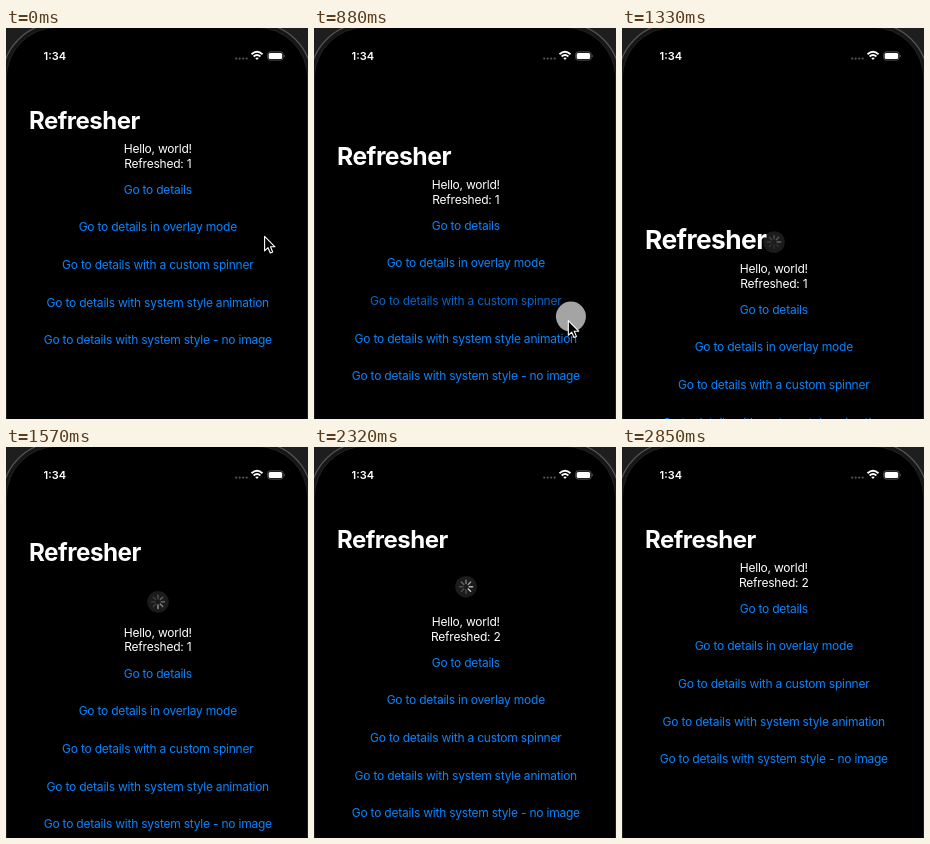
Write an HTML page that moves like this. It is 302 px wide and 391 px high and loops after 3800 ms.

```html
<!DOCTYPE html>
<html lang="en">
<head>
<meta charset="utf-8">
<title>Pull to refresh</title>
<style>
  html, body { margin: 0; width: 100%; height: 100%; overflow: hidden; background: #000; }
  svg { display: block; width: 302px; height: 391px; }
  text { font-family: Inter, "Liberation Sans", sans-serif; font-size: 12px; letter-spacing: -.22px; fill: #fff; }
  .mid { text-anchor: middle; }
  .link { fill: #0a84ff; }
  #title { font-size: 24px; font-weight: 700; letter-spacing: -.5px; }
  #clock { font-size: 11px; font-weight: 600; letter-spacing: 0; }
</style>
</head>
<body>
<svg viewBox="0 0 302 391">
  <rect width="302" height="391" fill="#1e1e1e"/>
  <rect x="-3.5" y="-4.5" width="309" height="520" rx="54.5" fill="#161616" stroke="#555" stroke-width="1.2"/>
  <rect x=".3" y="-.7" width="301.4" height="520" rx="51" fill="#000" stroke="#2a2a2a" stroke-width=".8"/>

  <g id="content">
    <text class="mid" x="151.8" y="124.7">Hello, world!</text>
    <text class="mid" x="151.8" y="139.5" id="count">Refreshed: 1</text>
  </g>
  <g id="spinner">
    <circle r="10.8" fill="#1b1b1c"/>
  </g>
  <g id="head"><text id="title">Refresher</text></g>

  <text id="clock" x="37.5" y="32">1:34</text>
  <g id="dots" fill="#555"></g>
  <g fill="none" stroke="#fff" stroke-width="1.8">
    <path d="M245.5 26.2Q251 21.4 256.5 26.2"/>
    <path d="M247.6 28.5Q251 25.6 254.4 28.5"/>
  </g>
  <path d="M249.2 30.1Q251 28.7 252.8 30.1L251 32Z" fill="#fff"/>
  <rect x="261.7" y="23.9" width="15.4" height="8.2" rx="2.4" fill="none" stroke="#666" stroke-width=".8"/>
  <rect x="262.7" y="24.9" width="13.4" height="6.2" rx="1.5" fill="#fff"/>
  <path d="M278.2 26.6q1.3 1.4 0 2.8z" fill="#888"/>

  <circle id="touch" r="15" fill="#a4a4a4"/>
  <path id="arrow" d="M0 0V14.6L3.4 11.4L5.7 16.7L8.1 15.7L5.9 10.5H10.4Z"
        fill="#000" stroke="#fff" stroke-width="1.1" stroke-linejoin="round"/>
</svg>
<script>
const LOOP = 3800, START = 530, TICK = 56.5;
const REST = 54, PEAK = 120;             // header height, furthest pull
const RELEASE = 14, DONE = 31, CLOSE = 33; // in ticks after the touch
const $ = id => document.getElementById(id);

function add(parent, tag, attrs, label = "") {
  const el = document.createElementNS("http://www.w3.org/2000/svg", tag);
  for (const key in attrs) el.setAttribute(key, attrs[key]);
  el.textContent = label;
  return parent.appendChild(el);
}

const links = [
  "Go to details",
  "Go to details in overlay mode",
  "Go to details with a custom spinner",
  "Go to details with system style animation",
  "Go to details with system style - no image"
].map((label, i) =>
  add($("content"), "text", { class: "mid link", x: 151.8, y: 165.6 + i * 37.65 }, label));

for (let i = 0; i < 4; i++) add($("dots"), "circle", { cx: 230.2 + i * 3.5, cy: 30.6, r: 1.1 });

const spokes = Array.from({ length: 8 }, (_, i) => add($("spinner"), "path", {
  d: "M3.2 0H6.6", stroke: "#fff", "stroke-width": 1.4, "stroke-linecap": "round",
  transform: `rotate(${i * 45})`
}));

const clamp = x => Math.min(1, Math.max(0, x));
const ease = (k, from, to) => (1 - Math.cos(Math.PI * clamp((k - from) / (to - from)))) / 2;
const move = (id, x, y, extra = "") => $(id).setAttribute("transform", `translate(${x} ${y}) ${extra}`);
const show = (id, on) => $(id).setAttribute("visibility", on ? "visible" : "hidden");

// Scroll offset: dragged down, then springing back to the open header.
function scrollAt(k) {
  if (k < RELEASE) return PEAK * ease(k, 1.3, RELEASE);
  return REST + (PEAK - REST) / Math.cosh(.62 * (k - RELEASE));
}

function draw(time) {
  const k = Math.floor((time - START) / TICK);
  const scroll = scrollAt(k);
  const pull = scroll - REST * ease(k, RELEASE, RELEASE + 4.5);
  const offset = scroll * (1 - ease(k, CLOSE, CLOSE + 8));

  move("content", 0, offset);
  move("head", 23, 101.2 + pull, `scale(${1 + pull * .0008})`);
  $("count").textContent = "Refreshed: " + (k < DONE ? 1 : 2);
  links[2].setAttribute("opacity", k < 0 ? 1 : .34 + .66 * ease(k, 0, 10));

  const exit = Math.max(0, k - CLOSE) / 5;
  const gap = 26 + 8.3 * ease(k, RELEASE, RELEASE + 8);
  show("spinner", k >= 10 && exit <= 1);
  move("spinner", 152, 120 + scroll - gap - 91 * exit ** 2);
  const lead = Math.floor((k + 3) / 2);
  const glow = .4 + .6 * ease(k, RELEASE, RELEASE + 8);
  spokes.forEach((spoke, i) => {
    const age = (lead - i + 64) % 8;
    spoke.setAttribute("opacity", glow * Math.max(.22, .8 - age * .12));
  });

  // The finger travels further than the content, which resists the pull.
  const x = 260 - scroll * .085, y = 209 + scroll * 2.2, lag = clamp(k / 6);
  show("touch", k >= 0 && k < RELEASE);
  show("arrow", k < RELEASE);
  move("touch", x, y);
  move("arrow", x - 1.4 - lag * 1.2, y - .7 + lag * 4.8);
}

function loop() {
  draw(performance.now() % LOOP);
  requestAnimationFrame(loop);
}
loop();
</script>
</body>
</html>
```
